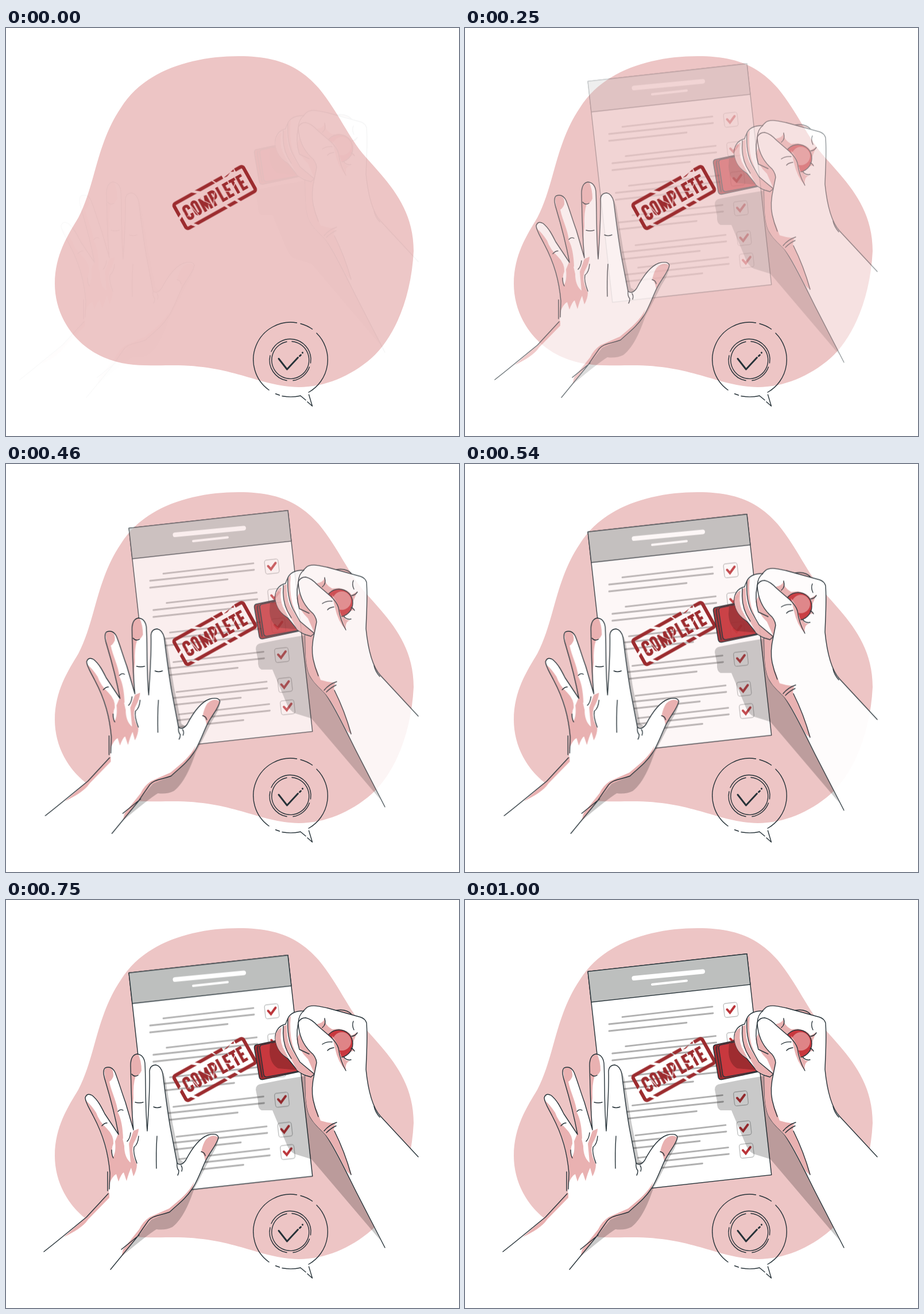
These frames come from a looping animation (789 px wide and 710 px high, 1040 ms). An HTML page:

```html
<!DOCTYPE html>
<html lang="en">
<head>
<meta charset="utf-8">
<title>Stamped checklist</title>
<style>
  html, body { margin: 0; width: 100%; height: 100%; overflow: hidden; background: #fff; }
  svg { display: block; width: 100vw; height: 100vh; }

  .ink { fill: none; stroke: #263238; stroke-width: 1.4; stroke-linecap: round; stroke-linejoin: round; }
  .skin { fill: #fff; }
  .blush { fill: #e9b1b1; }
  .shade { fill: #000; opacity: .21; }

  .paper, .left, .right { animation-play-state: paused; animation-fill-mode: both; }
  .paper {
    animation-name: drop; animation-duration: 1s; animation-delay: -20ms;
    animation-timing-function: cubic-bezier(.36, -.01, .5, 1.38);
  }
  .left {
    animation-name: slide; animation-duration: .66s; animation-delay: -56ms;
    animation-timing-function: cubic-bezier(.36, -.01, .5, 1.38);
  }
  .right { animation-name: press; animation-duration: 1.0417s; animation-timing-function: linear; }

  @keyframes drop { from { transform: translateY(-43px); opacity: 0; } }
  @keyframes slide { from { transform: translateX(-43px); opacity: 0; } }
  @keyframes press {
    0% { transform: translateY(-40.5px); opacity: .05; }
    16% { transform: translateY(-28.5px); opacity: .37; }
    32% { transform: translateY(-18px); opacity: .61; }
    44% { transform: translateY(-8.3px); opacity: .83; }
    52% { transform: translateY(-2.4px); opacity: .95; }
    60% { transform: translateY(.6px); opacity: 1; }
    72%, 100% { transform: none; opacity: 1; }
  }
</style>
</head>
<body>
<svg viewBox="0 0 789 710">
  <defs>
    <g id="row">
      <path d="M274 203.700L431 185.700M251 216L432 197M251 228L386 213.500" fill="none" stroke="#b0b0b0" stroke-width="2.800" stroke-linecap="round"/>
      <rect x="451" y="179" width="24" height="24.500" rx="4" fill="none" stroke="#bfc1c1" stroke-width="1.400" transform="rotate(-6.350 463 191)"/>
      <path d="M456.500 190.500L461.500 196L469.500 185" fill="none" stroke="#bb3439" stroke-width="4" stroke-linecap="round"/>
    </g>
    <mask id="wear" maskUnits="userSpaceOnUse" x="-80" y="-40" width="160" height="80">
      <rect x="-80" y="-40" width="160" height="80" fill="#fff"/>
      <g stroke="#000" fill="none">
        <path d="M-32 -31L-17 -19M-76 4L-60 -4M-58 20L-48 31M8 18L15 31M29 19L36 31" stroke-width="4.500"/>
        <path d="M29 -25H54" stroke-width="8"/>
        <path d="M9 -31L15 -19" stroke-width="2"/>
        <path d="M-45 -16L-39 15M-27 -16L-12 6M-57 6L-47 -2M-9 12L4 -8M19 -2L32 6M33 4L46 -7" stroke-width="1.300"/>
      </g>
      <path d="M31 -22.500L45 -25L36 -21ZM46 -25.500L53 -27L51 -23Z" fill="#fff"/>
    </mask>
  </defs>

  <path fill="#edc5c5" d="M405 49C470 49 510 65 545 105C580 148 596 190 626 224C665 268 710 312 710 388C706 470 676 540 636 575C600 606 555 625 510 625C440 623 400 589 300 587C250 586 215 592 170 573C115 549 85 497 85 445C85 395 108 360 126 330C155 275 158 200 200 139C240 74 325 49 405 49Z"/>

  <g class="paper">
    <g transform="translate(214 124.500) rotate(-6.350)">
      <path class="ink" style="fill:#fff" d="M0 0H278.700V387H0Z"/>
      <path class="ink" style="fill:#bdbfbe" d="M0 0H278.700V53.700H0Z"/>
    </g>
    <g stroke="#fff" stroke-linecap="round">
      <path d="M294.500 136L414 124.500" stroke-width="8"/>
      <path d="M326 147L386 140.500" stroke-width="4"/>
    </g>
    <use href="#row"/>
    <use href="#row" x="5.700" y="51"/>
    <use href="#row" x="11.500" y="102.500"/>
    <use href="#row" x="17.500" y="154"/>
    <use href="#row" x="23" y="206"/>
    <use href="#row" x="27.500" y="245"/>
  </g>

  <g transform="translate(363.500 295) rotate(-29.200)" role="img" aria-label="COMPLETE">
    <g mask="url(#wear)" fill="none" stroke="#9c2c2f" stroke-width="5">
      <rect x="-69" y="-24.500" width="138" height="49" rx="4" stroke-width="6"/>
      <g transform="translate(1.500)">
        <path d="M-50 -4V-7Q-50 -11.500 -54.200 -11.500Q-58.500 -11.500 -58.500 -7V7Q-58.500 11.500 -54.200 11.500Q-50 11.500 -50 7V4"/>
        <rect x="-42.500" y="-11.500" width="8" height="23" rx="4"/>
        <path d="M-26.500 14V-11L-20.500 6L-14.500 -11V14"/>
        <path d="M-6.500 14V-11.500H-3Q1.500 -11.500 1.500 -6.500V-4Q1.500 1 -3 1H-6.500"/>
        <path d="M9.500 -14V11.500H18"/>
        <path d="M31 -11.500H22.500V11.500H31M22.500 0H29.500"/>
        <path d="M33 -11.500H45M39 -11.500V14"/>
        <path d="M58 -11.500H49.500V11.500H58M49.500 0H56.500"/>
      </g>
    </g>
  </g>

  <g class="left">
    <path class="shade" d="M266 290Q277 300 279 320L290 388L303 452L312 458L371 414Q368 430 356 448C346 468 336 488 328 502C319 528 308 555 290 569Q278 575 262 573Q246 583 203 619L222 594L300 500Z"/>
    <path class="skin" d="M66 612C92 592 120 568 140 552L179 510L181 475C178 440 170 410 152 376C145 362 138 352 138 344Q141 335 150 340C160 348 166 360 172 372L196 408C190 375 182 345 173 315Q167 296 173 292Q184 288 190 300C196 315 200 330 208 352L222 400C218 360 218 320 217 288Q217 270 228 268Q240 269 242 284C244 320 242 355 246 402C248 370 251 330 250 298Q251 287 261 287Q270 289 273 302C276 325 280 360 286 395L298 458Q305 464 313 453C325 430 338 414 352 409Q368 405 370 413C368 425 356 437 347 455C338 475 332 492 324 503C312 521 300 529 285 543C265 550 256 549 248 558Q238 572 230 585L182 643Z"/>
    <g class="blush">
      <path d="M100 587C118 578 135 568 143 556L180 518V509L140 552Z"/>
      <path d="M139 349C148 367 156 384 161 394C174 420 179 448 181 475L179 496Q186 479 192 477L196 490Q201 476 205 474L210 489Q214 474 218 466L222 481Q228 470 228 460Q217 440 222 424Q231 408 231 398L222 402L214 424L217 457Q206 448 206 428L200 402L195 408L190 420Q192 440 186 448Q183 432 187 424Q188 410 176 398Q162 385 157 370Q148 356 139 349Z"/>
      <path d="M171 297Q172 291 180 291Q188 294 187 307Q184 314 180 316C184 336 193 350 195 370Q203 385 204 416L196 408C190 370 180 338 173 315Z"/>
      <path d="M218 278Q222 268 230 268Q236 280 236 297Q232 306 226 306Q221 320 222 345Q219 365 222 392Q217 340 217 290Z"/>
      <path d="M348 417Q359 406 370 413C367 426 355 438 347 454Q345 441 340 438Q343 424 348 417Z"/>
      <path d="M328 490C319 508 306 519 284 537Q270 543 250 552Q238 560 232 573L204 608L201 621L230 585Q244 568 250 558Q270 549 285 543Q312 521 324 503Z"/>
    </g>
    <path class="ink" d="M66 612C92 592 120 568 140 552L178 511M177 473V506M180 503L181 475C178 440 170 410 152 376C145 362 138 352 138 344Q141 335 150 340C160 348 166 360 172 372L196 408C190 375 182 345 173 315Q167 296 173 292Q184 288 190 300C196 315 200 330 208 352L222 400C218 360 218 320 217 288Q217 270 228 268Q240 269 242 284C244 320 242 355 246 402C248 370 251 330 250 298Q251 287 261 287Q270 289 273 302C276 325 280 360 286 395L298 458Q305 464 313 453C325 430 338 414 352 409Q368 405 370 413C368 425 356 437 347 455C338 475 332 492 324 503C312 521 300 529 285 543C265 550 256 549 248 558Q238 572 228 587L182 643M201 608L232 583"/>
    <path class="ink" d="M167 393Q171 388 176 388M195 368Q199 363 204 366M225 352Q232 354 239 352M219 303Q224 309 230 305M257 360Q263 363 270 360M263 411Q261 440 262 467M231 411Q230 425 223 430Q221 440 228 458M211 420Q216 415 217 405M184 435Q184 444 187 449M298 458Q297 466 301 471Q301 476 299 479M305 462Q308 466 306 472M340 438Q346 439 347 445"/>
  </g>

  <g class="right">
    <path class="shade" d="M435 330Q435 321 445 320L480 313L522 306L521 345C524 375 540 395 558 410L612 510L652 592L532 451L503 442Q495 438 490 428L464 366L445 366Q438 363 439 350Z"/>
    <path class="ink" style="fill:#9e2c30" d="M436 252L474 244L510 299L447 312.500Q442 313 441 308L432.500 258Q432 253 436 252Z"/>
    <path class="ink" style="fill:#c8383e" d="M446 252L476 246L508 298L454 308Q450 308 449 304L442 257Q442 253 446 252Z"/>
    <path fill="#9e2c30" d="M460 249H480L508 296L474 293Q460 285 459 264Z"/>
    <path class="ink" d="M439 254Q437 258 438 262L446 308"/>

    <path class="ink" style="fill:#e9b1b1" d="M575 192C590 189 601 195 605 204"/>
    <path class="ink" style="fill:#fff" d="M660 605L610 508C590 468 573 432 557 409C550 401 538 392 530 378C520 360 522 330 521 305Q512 301 507 296L491 276C478 268 471 256 469 242C468 230 474 219 487 216Q488 212 491 206C495 197 505 193 518 193L523 188C530 181 545 185 560 188L618 204Q626 207 628 214C630 240 628 265 627 295C630 325 636 358 652 376L718 447"/>

    <g class="blush">
      <path d="M470 232Q476 222 480 223Q476 240 482 256L492 275Q472 266 469 242Z"/>
      <path d="M483 220L489 217Q488 240 495 256L512 283L538 302L530 307Q514 302 507 296L496 276Q482 255 483 220Z"/>
      <path d="M491 207L496 201Q493 230 499 252L507 272Q489 245 491 207Z"/>
      <path d="M511 232Q517 252 529 263Q540 272 541 283L537 302L526 277Q510 262 506 242Z"/>
      <path d="M521 305L536 304C531 328 533 347 541 365L548 384Q560 388 573 389L571 400Q591 440 602 478Q594 476 588 462C573 432 566 421 557 409C550 401 538 392 530 378C520 360 522 330 521 305Z"/>
      <path d="M541 216Q553 214 555 206Q555 218 568 225L580 224Q596 227 602 236L612 230Q604 248 602 255L607 262Q596 264 590 272Q588 280 599 280Q590 283 592 297Q580 278 576 254Z"/>
    </g>

    <path class="ink" d="M483 219Q481 246 490 264L497 276M491 206Q489 240 500 261L512 282L537 303M509 214Q504 238 511 260L528 268M519 193Q510 199 509 214"/>
    <circle class="ink" style="fill:#c8383e" cx="580" cy="250" r="24"/>
    <circle cx="585" cy="246" r="16" fill="#df8487"/>
    <path class="skin" d="M509 214Q512 205 522 205Q532 207 543 219L565 238Q576 248 579 258L592 297L570 340L541 365C533 347 531 328 537 304L541 283Q540 272 530 264C516 250 510 232 509 214Z"/>
    <path class="blush" d="M568 236Q578 248 580 262L592 297Q578 282 573 258Z"/>
    <path class="ink" d="M541 283Q540 272 530 264C516 250 510 232 509 214Q512 205 522 205Q532 207 543 219L565 238Q576 248 579 258Q582 280 592 297M541 283L537 303Q531 328 535 348Q538 362 544 377M537 303L531 308L521 305M551 251Q558 246 568 247M560 262Q563 258 571 257M555 206Q558 217 551 222M602 237Q608 237 612 231M605 211Q602 218 606 226M601 258Q605 259 607 263M588 273Q594 280 601 278M554 402Q563 391 576 387M558 405Q566 397 575 393M572 402Q590 438 601 478M641 359Q643 369 651 378"/>
  </g>

  <g class="ink">
    <path d="M541 531A65 65 0 0 1 527 634M527.500 638L533.500 658L525 650.500M522 647.500L513 640Q497 643.500 481 640.500M476.500 639L469.500 636.500M458 630A65 65 0 0 1 506.500 513M513 514.500A65 65 0 0 1 533.500 524"/>
    <path d="M462 563A36 36 0 0 1 531 575L530.500 583M528.500 590A36 36 0 0 1 500 613.500M489 613.500A36 36 0 0 1 460 570"/>
    <path d="M498 545.500A32.500 32.500 0 1 1 489 546"/>
    <path d="M475 575.500L489.500 594L508.500 573.500M511.500 570.800L513.500 569M516.500 565.200V565" style="stroke-width:2.900"/>
  </g>
</svg>
<script>
  const LOOP = 1040, FPS = 24, LAST = 24;
  const start = performance.now();
  const moves = document.getAnimations();

  // Poses are held at 24 per second; 5 ms allows for rounded delays.
  function draw() {
    const t = (performance.now() - start) % LOOP;
    const pose = Math.min(LAST, Math.floor((t + 5) * FPS / 1000));
    for (const m of moves) m.currentTime = pose * 1000 / FPS;
    requestAnimationFrame(draw);
  }
  draw();
</script>
</body>
</html>
```
